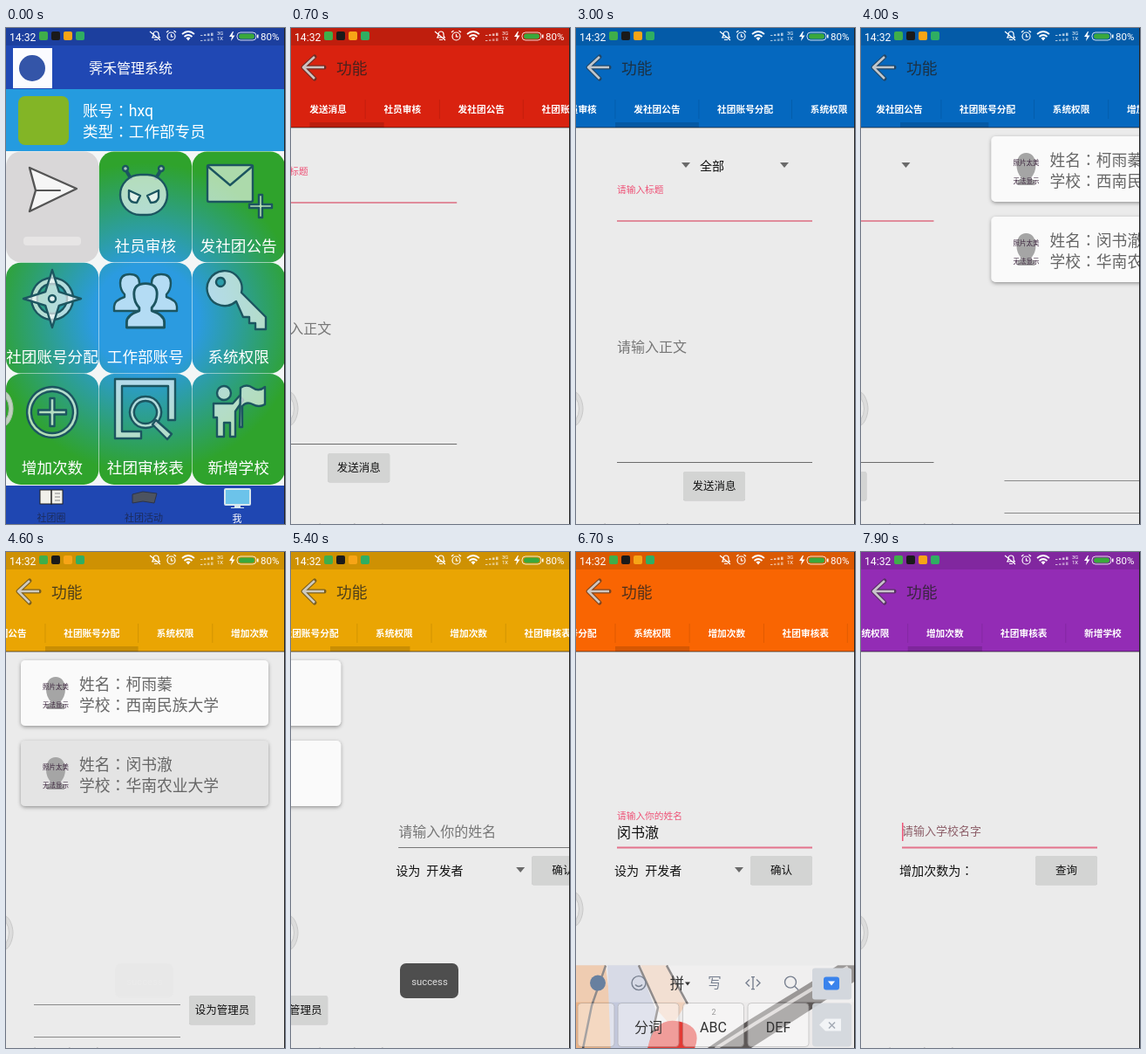
Animation of 320 by 568 pixels, one loop 8000 ms. Source, as an HTML page:

```html
<!DOCTYPE html>
<html lang="zh-CN">
<head>
<meta charset="utf-8">
<title>管理系统</title>
<style>
html, body { margin: 0; width: 100%; height: 100%; overflow: hidden; background: #ebebeb; }
svg { display: block; width: 100vw; height: 100vh; }
text { font-family: Roboto, "Noto Sans CJK SC", "Noto Sans CJK", sans-serif; white-space: pre; }
.colon { font-family: "Noto Sans CJK TC", "Noto Sans CJK", sans-serif; }
.icon { fill: rgba(255,255,255,.64); stroke: #1c5560; stroke-width: 2.4; stroke-linejoin: round; stroke-linecap: round; }
</style>
</head>
<body>
<svg id="stage" viewBox="0 0 320 568"></svg>
<script>
const LOOP = 8000, W = 320;
const PINK = '#ee5478', GREY = '#777', INK = '#111';

// ---------- markup helpers ----------
const rect = (x, y, w, h, fill, r = 0, more = '') =>
  `<rect x="${x}" y="${y}" width="${w}" height="${h}" rx="${r}" fill="${fill}" ${more}/>`;
const circle = (x, y, r, more = '') => `<circle cx="${x}" cy="${y}" r="${r}" ${more}/>`;
const path = (d, more = '') => `<path d="${d}" ${more}/>`;
const stroke = (d, color, w = 1, more = '') => path(d, `fill="none" stroke="${color}" stroke-width="${w}" ${more}`);
// full-width colons sit in the middle of their cell
const text = (x, y, s, size, fill = INK, more = '') =>
  `<text x="${x}" y="${(y + size * .37).toFixed(2)}" font-size="${size}" fill="${fill}" ${more}>` +
  s.replace('：', '<tspan class="colon" lang="zh-TW">：</tspan>') + '</text>';
const mid = 'text-anchor="middle"';
const group = (id, body, more = '') => `<g id="${id}" ${more}>${body}</g>`;
const line = (y, color, w = 1, x1 = 47, x2 = 271, more = '') => stroke(`M${x1} ${y}H${x2}`, color, w, more);
const caret = (x, y) => path(`M${x - 5} ${y - 3}h10l-5 6z`, 'fill="#6a6a6a"');
const button = (x, y, w, h, label) =>
  rect(x, y + .5, w, h, '#c2c2c2', 2) + rect(x, y, w, h, '#d3d4d3', 2) +
  text(x + w / 2, y + h / 2, label, 12.5, INK, mid + ' font-weight="500"');

// ---------- status bar ----------
const statusBar = () => {
  const white = 'fill="none" stroke="#fff" stroke-width="1.2"';
  return rect(0, 0, 320, 20, '#000', 0, 'opacity=".12"') + text(4, 10, '14:32', 12.2, '#fff') +
    rect(38, 4, 10, 10, '#3fae4a', 2) + rect(52, 4, 10, 10, '#1a1a1a', 2) +
    rect(66, 4, 10, 10, '#f7a416', 2) + rect(80, 4, 10, 10, '#2fae62', 2) +
    path('M167 11q2 0 2-4a3 3 0 0 1 6 0q0 4 2 4zM165 4l12 10M170 13.500h4', white) +
    circle(189.500, 9.500, 4.500, white) + path('M189.500 7v3h2.500M184 5l2.500-2M195 5l-2.500-2', white) +
    path('M202 7q7-6 14 0M204.500 10q4.500-4 9 0', 'fill="none" stroke="#fff" stroke-width="1.7"') +
    path('M206.500 11.500q2.500-2 5 0l-2.500 3z', 'fill="#fff"') +
    [0, 1].map(row => [0, 1, 2, 3].map(i =>
      rect(223 + i * 4, 8 + row * 6 - i * .8, 2.5, 1 + i * .8, i && row ? '#ffffff77' : '#ffffffaa')).join('')).join('') +
    text(242, 5.500, '3G', 6, '#fff') + text(242, 12, '1X', 6, '#fff') +
    path('M260 4l-4 6h3l-1 5 4.500-6.500h-3l1.500-4.500z', 'fill="#fff"') +
    rect(265, 5, 22, 9, 'none', 4, 'stroke="#fff" stroke-width=".8"') + rect(267, 6.500, 18, 6, '#3aa83c', 3) +
    rect(288, 7.500, 1.500, 4, '#fff') + text(292, 10, '80%', 11.500, '#fff');
};

// ---------- home screen ----------
const tileNames = ['发送消息', '社员审核', '发社团公告', '社团账号分配', '工作部账号', '系统权限', '增加次数', '社团审核表', '新增学校'];
const plus = (x, y, a, b) =>
  `M${x - b} ${y - a}h${2 * b}v${a - b}h${a - b}v${2 * b}h${b - a}v${a - b}h${-2 * b}v${b - a}h${b - a}v${-2 * b}h${a - b}z`;
const star = (x, y, R, r) => 'M' + [...Array(8)].map((_, i) => {
  const k = i % 2 ? r : R, a = i * Math.PI / 4;
  return `${(x + k * Math.sin(a)).toFixed(1)} ${(y - k * Math.cos(a)).toFixed(1)}`;
}).join('L') + 'z';
const person = (x, y, k) => path(
  'M-18 20v-5q0-7 12-11v-3q-5-5-5-13q0-10 11-10t11 10q0 8-5 13v3q12 4 12 11v5z',
  `style="fill:#b4dcf4" transform="translate(${x} ${y}) scale(${k})"`);

const icons = () =>
  path('M27 160L81 184L27 210L34 186z', 'style="fill:#f6f6f6;stroke:#555"') + stroke('M34 186H62', '#555', 2) +
  path('M143 172l-6-10M172 172l6-10', 'stroke-width="4"') + circle(137, 161, 3) + circle(178, 161, 3) +
  '<rect x="131" y="168" width="54" height="46" rx="23"/>' +
  path('M141 186l13 6-4 8q-8 0-9-6zM175 186l-13 6 4 8q8 0 9-6z') +
  rect(231, 157, 52, 42, 'rgba(255,255,255,.6)', 2) + path('M231 158l26 22 26-22', 'style="fill:none"') + path(plus(292, 204, 13, 2)) +
  path('M53 286a24 24 0 1 0 .1 0zM53 293a17 17 0 1 1-.1 0z', 'fill-rule="evenodd"') + path(star(53, 310, 33, 11)) + circle(53, 310, 4) +
  person(142, 304, 1) + person(178, 304, 1) + person(160, 319, 1.2) +
  path('M264 313a20 20 0 1 1 6-10l28 28v14h-12v-7h-7v-7h-7zM246 286a5 5 0 1 0 .1 0z', 'fill-rule="evenodd"') +
  path('M53 411a29 29 0 1 0 .1 0zM53 416a24 24 0 1 1-.1 0z', 'fill-rule="evenodd"') + path(plus(53, 440, 16, 2.5)) +
  path('M125 402h69v47h-8v-39h-53v52h22v8h-30z') +
  path('M160 422a18 18 0 1 0 .1 0zM160 427a13 13 0 1 1-.1 0z', 'fill-rule="evenodd"') + path('M172 449l18 16-5 6-17-17z') +
  circle(250, 418, 8) + path('M238 430h22l8-9 4 5-9 13v29h-6v-16h-7v16h-8v-22h-4z') + path('M269 412q7-5 14 0t14-1v20q-7 4-14 0t-12 2v24h-3z');

const homeScreen = () => {
  const tiles = tileNames.map((name, i) => {
    const x = i % 3 * 106.8, y = 141.5 + Math.floor(i / 3) * 127.3;
    return rect(x, y, 106.3, 126.8, i ? 'url(#glow)' : '#d9d7d8', 17) +
      (i ? text(x + 53, y + 107.5, name, 17.6, '#fff', mid) : rect(20, 239, 66, 10, '#ebe9e9', 4, 'opacity=".8"'));
  }).join('');
  return rect(0, 0, 320, 568, '#f3f6f6') + rect(0, 0, 320, 71, '#2048b4') +
    rect(8, 23, 45, 46, '#fbfbff') + circle(30, 46, 15, 'fill="#3455a8"') +
    text(95, 46, '霁禾管理系统', 16, '#fff') +
    rect(0, 70, 320, 71, '#259bdf') + rect(14, 78, 58, 56, '#83b526', 8) +
    text(88, 94, '账号：hxq', 17.6, '#fff') + text(88, 118, '类型：工作部专员', 17.6, '#fff') +
    tiles + group('icons', icons(), 'class="icon"') +
    rect(0, 524, 320, 44, '#1f47b2') +
    rect(39, 529, 26, 16, '#f1f0ea', 0, 'stroke="#222"') + stroke('M52 529V546', '#222', 1.5) + stroke('M56 533h6M56 537h6M56 541h6', '#888') +
    path('M145 534l12-3 16 2-3 11-13-2-12 2z', 'fill="#4c5360" stroke="#2c3348"') +
    rect(251, 528, 29, 18, '#6cc3ea', 1, 'stroke="#d7e7ee" stroke-width="2"') + path('M262 547h7v2h4v1h-15v-1h4z', 'fill="#d7e7ee"') +
    text(52, 561, '社团圈', 11, '#1c2c5c', mid) + text(158, 561, '社团活动', 11, '#1c2c5c', mid) +
    text(265, 562, '我', 11, '#fff', mid) + statusBar();
};

// ---------- tab strip ----------
const tabNames = tileNames.filter((_, i) => i !== 4);
const tabW = tabNames.map(n => n.length * 10.7 + 42.4);
const tabX = tabW.reduce((xs, w) => [...xs, xs[xs.length - 1] + w], [0]);
const stripEnd = tabX[tabNames.length] - W;

const header = () => rect(0, 0, 320, 114, '#000', 0, 'id="bar"') + statusBar() +
  stroke('M38 45H15M27 33L14 45L27 58', '#333', 5, 'opacity=".6" stroke-linejoin="round" stroke-linecap="round"') +
  stroke('M38 45H15M27 33L14 45L27 58', '#ddd', 2.6, 'opacity=".85" stroke-linejoin="round"') +
  text(52, 46, '功能', 17.8, '#222', 'opacity=".78"') +
  rect(0, 113, 320, 2, '#000', 0, 'opacity=".3"') +
  group('strip', tabNames.map((n, i) =>
    text(tabX[i] + tabW[i] / 2, 93, n, 10.7, '#fff', mid + ' font-weight="700"') +
    stroke(`M${tabX[i + 1]} 82V104`, '#000', 1, 'opacity=".1"')).join('') +
    rect(0, 108, 85, 6, '#000', 0, 'id="mark" opacity=".14"'));

// ---------- pages ----------
const form = (y, label) =>
  text(47, label, '请输入标题', 10.7, PINK) + line(y, '#dc6c80', 1.6) +
  text(47, y + 144, '请输入正文', 16, GREY) + line(y + 276.5, '#6c6c6c') + button(123, y + 287, 71, 33, '发送消息');

const card = (y, name, school, id) =>
  rect(17, y, 284, 75, '#fafafa', 5, `id="${id}" filter="url(#shade)"`) +
  path(`M47 ${y + 56}v-5l5-3q-6-6-6-15 1-14 11-14t11 14q0 9-6 15l5 3v5z`, 'fill="#a5a5a5"') +
  text(57, y + 30, '照片太美', 7.5, '#38213a', mid) + text(57, y + 51, '无法显示', 7.5, '#38213a', mid) +
  text(84, y + 27, '姓名：' + name, 17.8, '#666') + text(84, y + 51, '学校：' + school, 17.8, '#666');

const schools = ['全部', '北京大学', '华南农业大学', '华南师范大学', '华南理工大学'];
const dropdown = () => rect(134.5, 135.500, 99.5, 214, '#eee', 2, 'filter="url(#shade)"') +
  schools.map((s, i) => text(142, 157.5 + i * 42.5, s, 14.1)).join('');

const pages = () => [
  form(200, 164),
  '',
  caret(126, 157) + caret(239, 157) + text(142, 157.5, '全部', 14.1) + form(221, 185) + group('drop', dropdown()),
  card(124, '柯雨蓁', '西南民族大学', 'card1') + card(216, '闵书澈', '华南农业大学', 'card2') +
    line(518.5, '#8a8a8a', 1, 32, 200) + line(555.5, '#8a8a8a', 1, 32, 200) + button(210, 508, 76, 33, '设为管理员'),
  group('hint4', '') + text(47, 321.5, '闵书澈', 16, INK, 'id="typed"') + line(338.5, GREY, 1, 47, 271, 'id="line4"') +
    text(44, 365, '设为  开发者', 14.1) + caret(187, 364) + button(200, 348, 71, 33, '确认'),
  group('hint5', '') + rect(47, 310, 1.500, 21, PINK, 0, 'id="cursor5"') + line(338.5, GREY, 1, 47, 271, 'id="line5"') +
    text(44, 365, '增加次数为：', 14.1) + button(200, 348, 71, 33, '查询'),
].map((body, i) => `<g transform="translate(${i * W} 0)">${body}</g>`).join('');

// ---------- keyboard, drawn from y = 0 ----------
const wallpaper = () => rect(0, 0, 320, 204, '#eceaea') +
  path('M0 0H34L46 95L30 204H0z', 'fill="#eab184"') + path('M36 0H72L92 52L70 204H44z', 'fill="#c3c8dc"') +
  path('M74 0H104L126 44L110 70L94 52z', 'fill="#efd0bb"') +
  stroke('M34 0L18 46L8 95M72 0L94 48L84 95M104 0L128 44', '#4b4444', 2.5) +
  path('M82 95Q90 58 118 64T136 95z', 'fill="#e23a34"') +
  path('M150 95L196 64L300 0H320V18L200 95z', 'fill="#5d5857"') + stroke('M160 95L206 66L312 2', '#c9c4c2', 4);

const keyboard = () => {
  const rows = [['分词', 'ABC', 'DEF'], ['GHI', 'JKL', 'MNO'], ['PQRS', 'TUV', 'WXYZ']];
  const keys = rows.map((row, r) => {
    const y = 43 + r * 54;
    const box = (x, w) => rect(x, y, w, 50, '#fff', 4, 'opacity=".5" stroke="#aaa"');
    return box(2, 42) + row.map((k, c) => box(48 + c * 74.5, 70) +
      text(83 + c * 74.5, y + 28, k, 16, '#333', mid)).join('') + rect(271, y, 45, 50, '#d3d7dd', 4, 'opacity=".9"');
  }).join('');
  const tool = 'fill="none" stroke="#788090" stroke-width="1.4"';
  return wallpaper() + rect(0, 0, 320, 42, '#f6f6f6', 0, 'opacity=".4"') + keys +
    text(158, 53, '2', 9, '#999', mid) + circle(25, 20, 9, 'fill="#68809f"') +
    circle(72, 20, 8, tool) + path('M68 22q4 4 8 0', tool) +
    text(116, 20, '拼', 16.5, '#333', mid) + path('M125 19h6l-3 4z', 'fill="#333"') + text(159, 20, '写', 15.5, '#788090', mid) +
    path('M199 16l-4 4 4 4M207 16l4 4-4 4M203 13v14M201 13h4M201 27h4', tool) +
    circle(246, 19, 6.500, tool) + path('M251 24l4 4', tool) +
    rect(271, 3, 45, 36, '#d3d7dd', 3) + rect(284, 13, 18, 15, '#3a83ec', 3) + path('M289 18h8l-4 5z', 'fill="#fff"') +
    path('M279 68l7-7h18v14h-18z', 'fill="#f2f4f6"') + stroke('M290 65l7 7m0-7l-7 7', '#a4abb5', 1.5);
};

stage.innerHTML = '<defs>' +
  '<radialGradient id="glow" gradientUnits="userSpaceOnUse" cx="160" cy="332" r="178">' +
  '<stop offset=".34" stop-color="#2b9be0"/><stop offset="1" stop-color="#2fa32c"/></radialGradient>' +
  '<filter id="shade" x="-10%" y="-10%" width="120%" height="125%"><feDropShadow dx="0" dy="1.5" stdDeviation="2" flood-opacity=".38"/></filter></defs>' +
  homeScreen() +
  group('tool', rect(0, 0, 320, 568, '#ebebeb') + group('pager', pages()) + header()) +
  group('toast', rect(125, 471, 67, 40, '#4e4e4e', 7) + text(159, 492, 'success', 11.3, '#ddd', mid)) +
  group('keys', keyboard()) +
  group('ball', path('M0 417C4 419 8 428 8 436S4 453 0 455V448Q3.500 443 3.500 436T0 424z', 'fill="#dadada" stroke="#c2c2c2" opacity=".85"')) +
  rect(319, 0, 1, 568, '#222');

// ---------- motion ----------
const $ = id => document.getElementById(id);
const clamp = v => Math.max(0, Math.min(1, v));
const ramp = (t, a, b) => clamp((t - a) / (b - a));
const out = u => 1 - (1 - u) ** 2;
const mix = (a, b, u) => a + (b - a) * u;
const set = (id, attrs) => { for (const k in attrs) $(id).setAttribute(k, attrs[k]); };

// [time, page, ease out]
const swipes = [[0, 0], [500, 0], [620, .25], [720, .253], [1000, 1, 1], [1300, 1], [1500, 1.5], [1750, 2, 1],
  [3700, 2], [3900, 2.2], [4000, 2.584], [4400, 3, 1], [5200, 3], [5300, 3.5], [5400, 3.76], [5650, 4, 1],
  [7500, 4], [7620, 4.4], [7800, 5, 1], [LOOP, 5]];
const pageAt = t => {
  const i = Math.max(1, swipes.findIndex(s => s[0] >= t));
  const [a, from] = swipes[i - 1], [b, to, ease] = swipes[i];
  const u = ramp(t, a, b);
  return mix(from, to, ease ? out(u) : u);
};
const barColors = [[0, '#d9220f'], [750, '#2f9a43'], [1500, '#0568bf'], [4050, '#eaa503'], [5450, '#f96502'], [7650, '#932cb5']];

function hint(id, label, size, y, color) {
  $(id).innerHTML = text(47, y, label, size, color);
}

function render(t) {
  set('tool', { transform: `translate(${W * (1 - out(ramp(t, 190, 400)))} 0)` });
  set('bar', { fill: barColors.filter(c => c[0] <= t).pop()[1] });
  set('pager', { transform: `translate(${-W * pageAt(t)} 0)` });

  // the strip trails the pages slightly
  const p = pageAt(Math.max(0, t - 20)), i = Math.min(5, Math.floor(p)), f = p - i;
  const x = mix(tabX[i], tabX[i + 1], f);
  const scroll = Math.max(0, Math.min(stripEnd, x - 45));
  set('strip', { transform: `translate(${-scroll} 0)` });
  set('mark', { x, width: mix(tabW[i], tabW[i + 1], f) });

  set('drop', { opacity: ramp(t, 1780, 1890) * (1 - ramp(t, 2390, 2520)) });
  set('card2', { fill: t >= 4600 && t < 4700 ? '#e4e4e4' : '#fafafa' });
  set('toast', { opacity: ramp(t, 4600, 4700) * (1 - ramp(t, 6300, 6400)) });

  const u = ramp(t, 5720, 5860);
  hint('hint4', '请输入你的姓名', mix(16, 10.7, u), mix(320.5, 302.5, u), u > .5 ? PINK : GREY);
  set('line4', { stroke: u > .5 ? '#e4738c' : GREY, 'stroke-width': u > .5 ? 2 : 1 });
  set('typed', { opacity: t >= 6400 ? 1 : 0 });

  const v = ramp(t, 7820, 7900);
  hint('hint5', '请输入学校名字', mix(16, 13, v), mix(320.5, 319, v), v > .5 ? '#8d5f69' : GREY);
  set('line5', { stroke: v > .5 ? '#e4738c' : GREY, 'stroke-width': v > .5 ? 2 : 1 });
  set('cursor5', { opacity: v > .5 ? 1 : 0 });

  const top = t < 6500 ? mix(568, 364, out(ramp(t, 5750, 5980))) : 364 + 204 * ramp(t, 6513, 6863);
  set('keys', { transform: `translate(0 ${top})` });
  set('ball', { transform: `translate(0 ${top < 568 ? -27 : 0})` });
}

const start = performance.now();
function tick() {
  render((performance.now() - start) % LOOP);
  requestAnimationFrame(tick);
}
tick();
</script>
</body>
</html>
```
